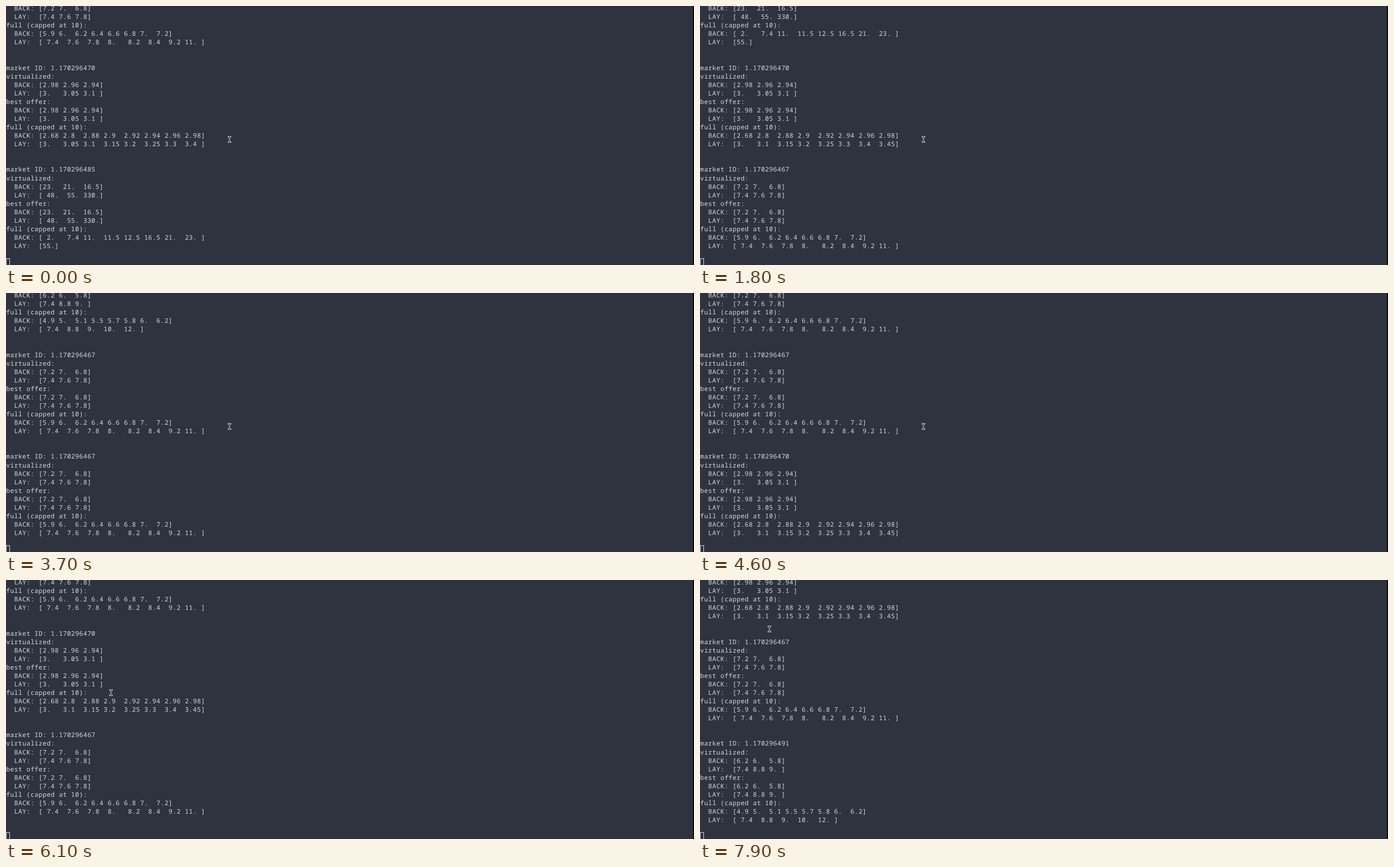
An HTML page for the animation above (8 s loop, 1219 by 460 pixels).

```html
<!DOCTYPE html>
<html lang="en">
<head>
<meta charset="utf-8">
<title>Market odds log</title>
<style>
  html, body { margin: 0; width: 100%; height: 100%; overflow: hidden; background: #2e333f; }
  svg { display: block; width: 1219px; height: 460px; }
  text {
    white-space: pre; fill: #d3d7de; text-rendering: geometricPrecision;
    font: 11.3px "Noto Sans Mono", "DejaVu Sans Mono", monospace;
    letter-spacing: calc(7.2px - 0.6em);
  }
</style>
</head>
<body>
<svg viewBox="0 0 1219 460">
  <rect width="1219" height="460" fill="#2e333f"/>
  <rect x="1217" width="2" height="460" fill="#0b0d12"/>
  <g id="log"></g>
  <rect x="0.5" y="448.5" width="6" height="14" fill="none" stroke="#d3d7de"/>
  <g id="pointer" fill="none">
    <path d="M-1.8 -4.8H1.8M0 -4.8V4.8M-1.8 4.8H1.8" stroke="#ccd0d7" stroke-width="2.4" stroke-linecap="square"/>
    <path d="M-1.8 -4.8H1.8M0 -4.8V4.8M-1.8 4.8H1.8" stroke="#23262e" stroke-width="1"/>
  </g>
</svg>
<script>
const LOOP = 8000, STEP = 100;
const ROWS = 30, ROW_HEIGHT = 15.07, BASELINE = 8.1;

function block(id, back, lay, fullBack, fullLay) {
  const pair = (b, l) => [`  BACK: [${b}]`, `  LAY:  [${l}]`];
  return [
    `market ID: 1.170296${id}`,
    'virtualized:', ...pair(back, lay),
    'best offer:', ...pair(back, lay),
    'full (capped at 10):', ...pair(fullBack, fullLay),
    '', ''
  ];
}

const m467 = block(467, '7.2 7.  6.8', '7.4 7.6 7.8',
  '5.9 6.  6.2 6.4 6.6 6.8 7.  7.2', ' 7.4  7.6  7.8  8.   8.2  8.4  9.2 11. ');
const m470 = lay => block(470, '2.98 2.96 2.94', '3.   3.05 3.1 ',
  '2.68 2.8  2.88 2.9  2.92 2.94 2.96 2.98', lay);
const m470a = m470('3.   3.05 3.1  3.15 3.2  3.25 3.3  3.4 ');
const m470b = m470('3.   3.1  3.15 3.2  3.25 3.3  3.4  3.45');
const m485 = block(485, '23.  21.  16.5', ' 48.  55. 330.',
  ' 2.   7.4 11.  11.5 12.5 16.5 21.  23. ', '55.');
const m488 = block(488, '13.5 13.   9.6', '30. 32. 34.',
  ' 1.03  5.8   6.    7.2   7.6   9.4   9.6  13.  ', '32. 34. 44.');
const m491 = block(491, '6.2 6.  5.8', '7.4 8.8 9. ',
  '4.9 5.  5.1 5.5 5.7 5.8 6.  6.2', ' 7.4  8.8  9.  10.  12. ');

// The top block is cut off; skip is the number of its lines already scrolled away.
const screens = [
  { at: 0, blocks: [m467, m470a, m485] },
  { at: 1100, blocks: [m485, m485, m470b] },
  { at: 1800, blocks: [m485, m470b, m467] },
  { at: 3300, blocks: [m488, m467, m491] },
  { at: 3700, blocks: [m491, m467, m467] },
  { at: 4600, blocks: [m467, m467, m470b] },
  { at: 6100, blocks: [m467, m470b, m467], skip: 6 },
  { at: 6200, blocks: [m470b, m467, m491] }
];

const home = { x: 396, y: 237 };
const moves = [
  { at: 5200, steps: 6, x: 186, y: 200 },
  { at: 6600, steps: 4, x: 107, y: 87 },
  { at: 7300, steps: 2, x: 133, y: 98 },
  { at: 7800, steps: 1, x: 137, y: 94 },
  { at: 7900, steps: 1, x: 123, y: 87 }
];

const log = document.getElementById('log');
const pointer = document.getElementById('pointer');

const rows = Array.from({ length: ROWS }, (_, i) => {
  const row = document.createElementNS('http://www.w3.org/2000/svg', 'text');
  row.setAttribute('x', 0.2);
  row.setAttribute('y', BASELINE + i * ROW_HEIGHT);
  return log.appendChild(row);
});

const smooth = p => p * p * (3 - 2 * p);

function pointerAt(t) {
  let { x, y } = home;
  for (const m of moves) {
    if (t < m.at) break;
    const p = smooth(Math.min(1, (Math.floor((t - m.at) / STEP) + 1) / m.steps));
    x += (m.x - x) * p;
    y += (m.y - y) * p;
  }
  return `translate(${Math.round(x)} ${Math.round(y)})`;
}

let shown;
function showScreen(screen) {
  if (screen === shown) return;
  shown = screen;
  const lines = screen.blocks.flat().slice(screen.skip || 5);
  rows.forEach((row, i) => { row.textContent = lines[i] || ''; });
}

function draw() {
  const t = performance.now() % LOOP;
  showScreen(screens.filter(s => s.at <= t).pop());
  pointer.setAttribute('transform', pointerAt(t));
  requestAnimationFrame(draw);
}
draw();
</script>
</body>
</html>
```
